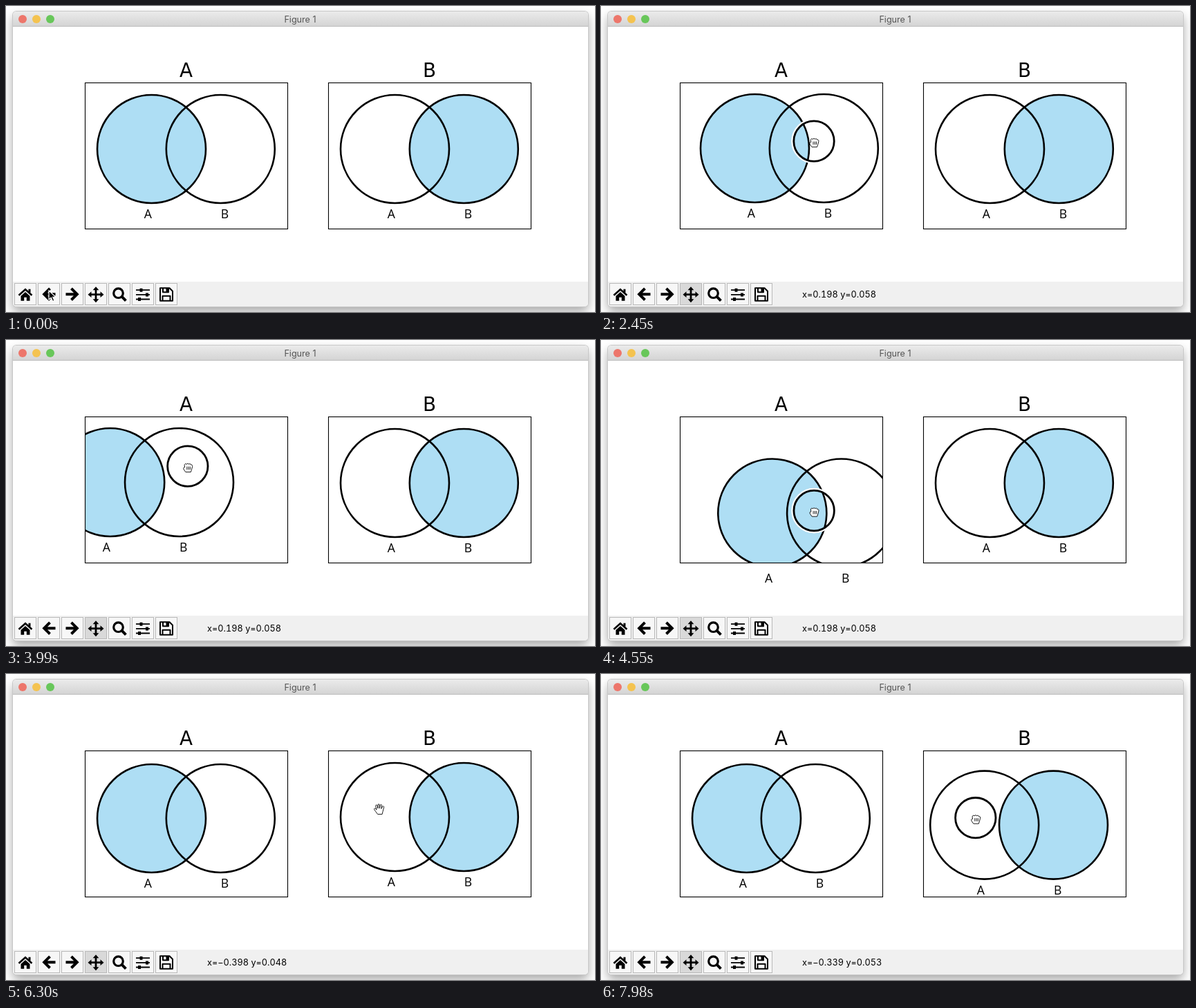
Write an HTML page that moves like this. It is 852 px wide and 444 px high and loops after 8 s.

```html
<!DOCTYPE html>
<html lang="en">
<head>
<meta charset="utf-8">
<title>Figure 1</title>
<style>
  html, body { margin: 0; width: 100%; height: 100%; overflow: hidden; background: #fff; }
  svg { display: block; width: 852px; height: 444px; position: absolute; left: 0; top: 0; }
  #win {
    position: absolute; left: 10px; top: 8px; width: 832px; height: 428px;
    border-radius: 5px; overflow: hidden; background: #fff;
    box-shadow: 0 0 0 1px #c8c8c8, 0 7px 15px rgba(0, 0, 0, .36);
  }
  #bar { height: 21px; background: linear-gradient(#ebebeb, #d4d4d4); border-bottom: 1px solid #bcbcbc; }
  #tools { position: absolute; top: 392px; width: 100%; height: 36px; background: #f0f0f0; }
  .ui { font: 12.6px Inter, "Liberation Sans", sans-serif; }
  #status { font-size: 12.75px; font-variant-numeric: tabular-nums; }
  .plot { text-anchor: middle; }
  .name { font: 27.8px "DejaVu Sans", sans-serif; }
  .set { font: 17.6px "Open Sans", sans-serif; }
  .disc { fill: none; stroke: #000; stroke-width: 2.6; }
  .area { fill: #aedef4; }
  .frame { fill: none; stroke: #000; stroke-width: 1.1; }
  .btn { fill: #f7f7f7; stroke: #b9b9b9; }
  .btn.on { fill: #d9d9d9; }
  .line { fill: none; stroke: #000; }
  .hand { fill: #fff; stroke: #000; stroke-width: .9; stroke-linejoin: round; }
</style>
</head>
<body>
<div id="win"><div id="bar"></div><div id="tools"></div></div>
<svg viewBox="0 0 852 444">
  <circle cx="24" cy="19" r="6" fill="#ed766b"/>
  <circle cx="44" cy="19" r="6" fill="#f4c350"/>
  <circle cx="64" cy="19" r="6" fill="#68c75a"/>
  <text class="ui" x="425.5" y="23.5" text-anchor="middle" fill="#555">Figure 1</text>
  <g id="plots" class="plot"></g>
  <g id="buttons"></g>
  <g id="icons" transform="translate(0 -.3)">
    <path class="line" stroke-width="2.6" d="M18.5 420 28 411.5 37.5 420"/>
    <path d="M32.5 411h3v5h-3zM21.5 421 28 415.2 34.5 421V428H29.8V423H26.2V428H21.5Z"/>
    <path class="line" stroke-width="4" d="M71.5 418.5H56M63.5 410.2 55.2 418.5 63.5 426.8"/>
    <path class="line" stroke-width="4" d="M86.5 418.5H102M94.5 410.2 102.8 418.5 94.5 426.8"/>
    <path class="line" stroke-width="2.8" d="M122 419H138M130 411V427"/>
    <path d="M130 407.5l4.4 5h-8.8zM130 430.5l4.4-5h-8.8zM118.5 419l5-4.4v8.8zM141.5 419l-5-4.4v8.8z"/>
    <circle class="line" cx="162.5" cy="417" r="6.8" stroke-width="3.2"/>
    <path class="line" stroke-width="4" d="M167.5 422 173.4 428"/>
    <path class="line" stroke-width="1.8" d="M188 412.5H208M188 419.2H208M188 425.8H208"/>
    <path d="M193.5 410h4v5h-4zM202 416.7h4v5h-4zM191 423.3h4v5h-4z"/>
    <path class="line" stroke-width="2" stroke-linejoin="round" d="M223 409.5H236.5L241 414V428H223ZM226.5 428V421H237.5V428M227 410V415.5H235V410"/>
    <path d="M231.5 410h3v5h-3z"/>
  </g>
  <text id="status" class="ui" x="291" y="423.3"></text>
  <g id="ring" fill="none">
    <circle r="31.6" stroke="#fff" stroke-width="2.4"/>
    <circle r="29.2" stroke="#000" stroke-width="2.8"/>
  </g>
  <path id="arrow" stroke="#fff" stroke-width="1.2" d="M0 0V13L3.2 10.2 5.6 15.5 8 14.4 5.7 9.3H10Z"/>
  <path id="open" class="hand" d="M-3 7-6 3-8 0C-8.5-1.5-6.5-2-5.5-.5L-4.5 .5-6-5C-6-6.8-4-7-3.6-5.2L-2.6-1.5V-6.5C-2.5-8.2-.5-8.2-.4-6.5L-.2-1.5 .8-6C1.2-7.8 3.2-7.2 3-5.5L2.3-1 4-4C5-5.3 6.6-4.4 6-2.8L4.5 3 3.5 7Z"/>
  <path id="fist" class="hand" d="M-3.5 6.5-6 3C-7.4 .5-6-.8-4.8-.4L-5.2-3.5C-5-6-2.6-6-2.2-4.6C-1.6-6.4 .8-6.2 1-4.8C2-6 4-5.6 4-4C5.6-4.6 6.6-3.4 6.3-1.5L5 3.5 4 6.5ZM-1.5-1.5V3M.8-1.5V3M3-1.5V3"/>
</svg>
<script>
const $ = id => document.getElementById(id);
const LOOP = 8000, STEP = 70, LAG = 90, UNIT = 187, Y0 = 207;

const panels = [
  { left: 114.5, mid: 261 },
  { left: 466.5, mid: 613 }
];

function panelMarkup({ left }, i) {
  const cx = [left + 96, left + 195.8];
  const disc = (x, cls) => `<circle class="${cls}" cx="${x}" cy="207.5" r="78.5"/>`;
  const label = (x, s) => `<text class="set" x="${x}" y="308">${s}</text>`;
  const box = `x="${left}" y="111.5" width="293" height="212"`;
  return `<clipPath id="clip${i}"><rect ${box}/></clipPath>
    <g clip-path="url(#clip${i})"><g class="pan${i}">
      ${disc(cx[i], "area")}${disc(cx[0], "disc")}${disc(cx[1], "disc")}
    </g></g>
    <rect class="frame" ${box}/>
    <g class="pan${i}">${label(left + 90.7, "A")}${label(left + 202, "B")}</g>
    <text class="name" x="${left + 146}" y="103">${"AB"[i]}</text>`;
}

$("plots").innerHTML = panels.map(panelMarkup).join("");
$("buttons").innerHTML = Array.from({ length: 7 }, (_, i) =>
  `<rect class="btn" x="${12.5 + 34 * i}" y="402.5" width="31" height="31"/>`).join("");
const panButton = $("buttons").children[3];

// Smooth 0 to 1 between times a and b
function ease(t, a, b) {
  const u = Math.min(1, Math.max(0, (t - a) / (b - a)));
  return u * u * (3 - 2 * u);
}
const mix = (p, q, u) => [p[0] + (q[0] - p[0]) * u, p[1] + (q[1] - p[1]) * u];

// Eased moves, one after the other
const glide = (p, moves, t) =>
  moves.reduce((q, m) => mix(q, m.to, ease(t, m.from, m.until)), p);

const pointerMoves = [
  { from: 70, until: 420, to: [128, 416] },
  { from: 980, until: 1330, to: [279.7, 207.4] },
  { from: 1400, until: 1800, to: [298, 196.15] },
  { from: 5420, until: 5740, to: [436, 206] },
  { from: 5880, until: 6400, to: [549.6, 197.1] }
];

// Each drag: small rests joined by a stretch of circling
const drags = [
  {
    start: 1850, end: 5420, grab: [298.03, 196.15],
    rests: [
      { from: 1890, until: 2240, to: [12, -1] },
      { from: 2360, until: 2450, to: [10, 0] },
      { from: 3000, until: 3600, to: [1, -4.6] },
      { from: 5180, until: 5400, to: [0, 2] }
    ],
    swirl: { from: 2450, until: 5060, ramp: [300, 580], mid: [-9, 19.6], r: [62, 36], peak: 4335, period: 1080 }
  },
  {
    start: 6560, end: LOOP, grab: [549.6, 197.1],
    rests: [{ from: 7000, until: 7400, to: [-7.8, 11.6] }],
    swirl: { from: 6580, until: 7850, ramp: [220, 400], mid: [7.7, 3.7], r: [21.6, 18.8], peak: 7026, period: -925 }
  }
];

function dragOffset({ rests, swirl: s }, t) {
  const angle = 2 * Math.PI * (t - s.peak) / s.period;
  const round = [s.mid[0] + s.r[0] * Math.cos(angle), s.mid[1] + s.r[1] * Math.sin(angle)];
  const amount = ease(t, s.from, s.from + s.ramp[0]) - ease(t, s.until - s.ramp[1], s.until);
  return mix(glide([0, 0], rests, t), round, amount);
}

const format = v => v.toFixed(3).replace("-", "\u2212");

function place(id, show, x, y) {
  $(id).setAttribute("visibility", show ? "visible" : "hidden");
  $(id).setAttribute("transform", `translate(${x} ${y})`);
}

function draw(t) {
  // The plots follow the pointer with a short delay
  const shifts = drags.map(d => dragOffset(d, t - LAG));
  shifts.forEach(([dx, dy], i) => {
    for (const g of document.querySelectorAll(".pan" + i))
      g.setAttribute("transform", `translate(${dx} ${dy})`);
  });

  const held = drags.findIndex(d => t >= d.start && t < d.end);
  const dragging = held >= 0;
  let [x, y] = glide([62, 413], pointerMoves, t);
  let [px, py] = [x, y], shift = [0, 0];
  if (dragging) {
    const [dx, dy] = dragOffset(drags[held], t);
    [px, py] = drags[held].grab;
    x = px + dx;
    y = py + dy;
  }

  const over = dragging ? held :
    panels.findIndex(p => x > p.left && x < p.left + 293 && y > 111 && y < 324);
  const inside = over >= 0;
  if (inside && !dragging) shift = shifts[over];
  $("status").textContent = inside
    ? `x=${format((px - shift[0] - panels[over].mid) / UNIT)} y=${format((Y0 + shift[1] - py) / UNIT)}`
    : "";
  panButton.classList.toggle("on", t >= 630);

  place("ring", dragging, x, y);
  place("fist", dragging, x + .5, y + 2);
  place("open", inside && !dragging, x + 2, y - 1.5);
  place("arrow", !inside, x, y);
}

function tick() {
  const t = performance.now() % LOOP;
  draw(Math.floor(t / STEP) * STEP);
  requestAnimationFrame(tick);
}
tick();
</script>
</body>
</html>
```
